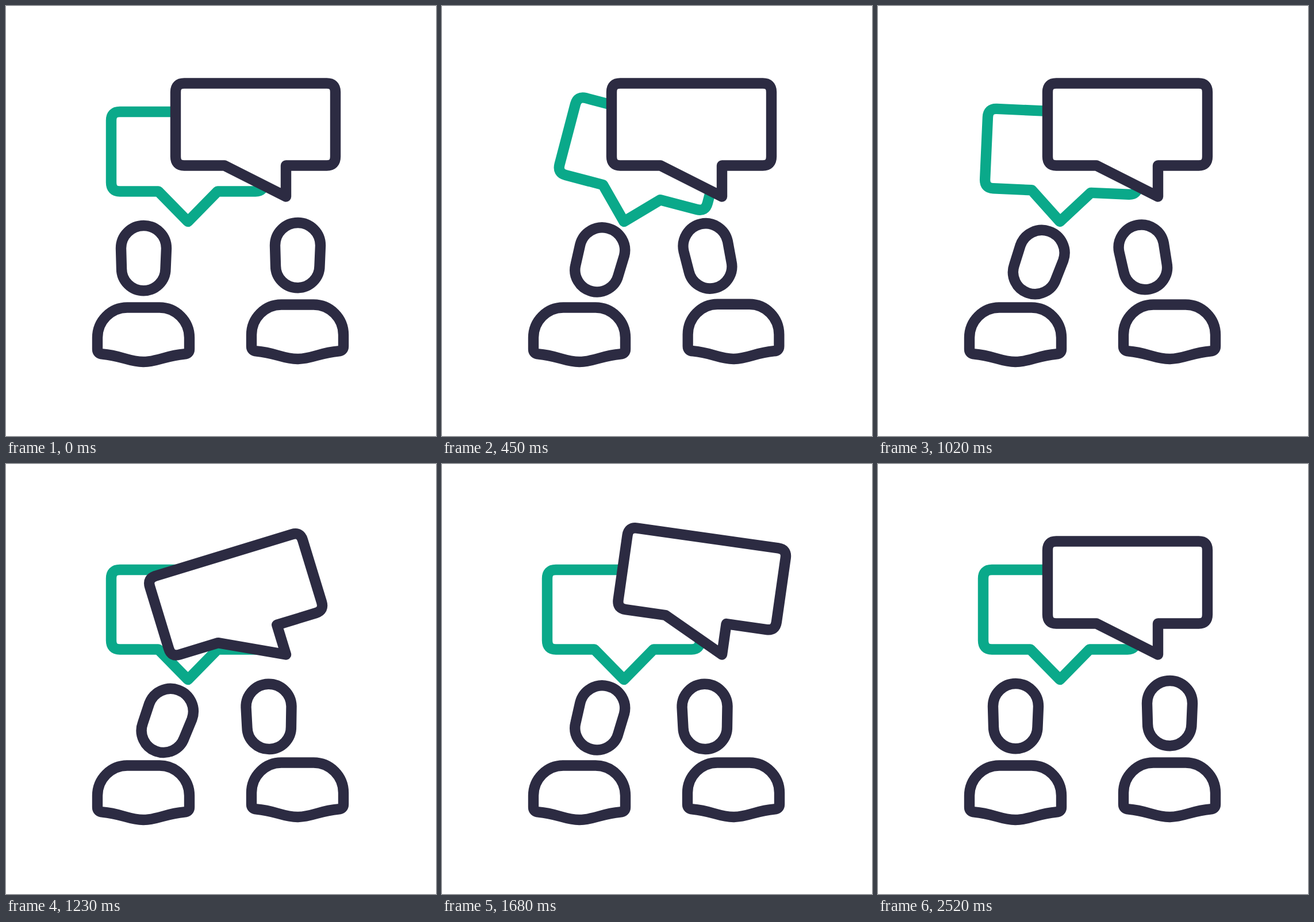
Write an HTML page that moves like this. It is 748 px wide and 748 px high and loops after 2550 ms.

```html
<!DOCTYPE html>
<html lang="en">
<head>
<meta charset="utf-8">
<title>Conversation</title>
<style>
  html, body { margin: 0; width: 100%; height: 100%; overflow: hidden; background: #fff; }
  svg { display: block; width: 100vw; height: 100vh; }
  path { fill: #fff; stroke: #2c2b42; stroke-width: 18.4; stroke-linejoin: round; }
  #back path { stroke: #0aa98a; }
</style>
</head>
<body>
<svg viewBox="0 0 748 748">
  <g id="back">
    <path d="M198 184H434Q449 184 449 199V307Q449 322.5 434 322.5H368L316.5 375L265 322.5H198Q183 322.5 183 307V199Q183 184 198 184Z"/>
  </g>
  <g id="front">
    <path d="M310 134.5H558Q573 134.5 573 149.5V262Q573 277.5 558 277.5H487V331.5L380 277.5H310Q295 277.5 295 262V149.5Q295 134.5 310 134.5Z"/>
  </g>
  <g id="left"></g>
  <g transform="translate(268 -5)"><g id="right"></g></g>
</svg>
<script>
const LOOP = 2550, STEP = 30;
const CX = 239.25, HEAD_Y = 439.25, GROUND = 628;
const $ = id => document.getElementById(id);

$('left').innerHTML = $('right').innerHTML = `
  <path class="head" d="M200 421.5A39.5 39.5 0 0 1 279 421.5L277.5 457A38.25 38.25 0 0 1 201 457Z"/>
  <path d="M159 577A52 52.5 0 0 1 211 524.5H267A52 52.5 0 0 1 319 577V597
    Q319 605 310 605.5C278 608 264 619 239 619C214 619 200 608 168 605.5
    Q159 605 159 597Z"/>`;

// Sine ease from 0 to 1 between two times.
function ease(t, from, to) {
  const k = Math.min(1, Math.max(0, (t - from) / (to - from)));
  return (1 - Math.cos(Math.PI * k)) / 2;
}

// Bubble angle: a damped swing that quickens slightly.
function swing(t) {
  if (t < 0 || t > 1140) return 0;
  return -25.4 * (1 - t / 1140) * Math.sin(Math.PI * (t / 335) ** 1.15);
}

// Body squash with a small stretch at the end.
function squash(t) {
  if (t < 0 || t > 430) return 0;
  return 0.065 * (1 - t / 430) * Math.sin(Math.PI * t / 280);
}

function turn(id, angle, x, y) {
  $(id).setAttribute('transform', `rotate(${angle} ${x} ${y})`);
}

function pose(id, s, x, y, tilt) {
  $(id).setAttribute('transform',
    `translate(${CX} ${GROUND}) scale(${1 + s} ${1 - s}) translate(${-CX} ${-GROUND})`);
  $(id).querySelector('.head').setAttribute('transform',
    `translate(${x} ${y}) rotate(${tilt} ${CX} ${HEAD_Y})`);
}

function draw(t) {
  turn('back', swing(t), 316.5, 375);
  turn('front', swing(t - 1125), 487, 331.5);

  let lean = ease(t, 0, 270) - ease(t, 2040, 2280);
  let nod = ease(t, 450, 1230) - ease(t, 1230, 1650);
  pose('left', squash(t) + squash(t - 2040),
    34.75 * lean + 6 * nod, 2.75 * lean + 5 * nod, 14.4 * lean + 5.6 * nod);

  const back = ease(t, 1850, 2090);
  lean = ease(t, 120, 400) - back;
  nod = ease(t, 960, 1200) - back;
  pose('right', squash(t - 120) + squash(t - 1840),
    -45.2 * lean - 4.8 * nod, 2.8 * lean + 3 * nod, -13 * lean + 11.5 * nod);
}

const begin = performance.now();
function tick() {
  const t = (performance.now() - begin) % LOOP;
  draw(Math.floor(t / STEP) * STEP);
  requestAnimationFrame(tick);
}
tick();
</script>
</body>
</html>
```
